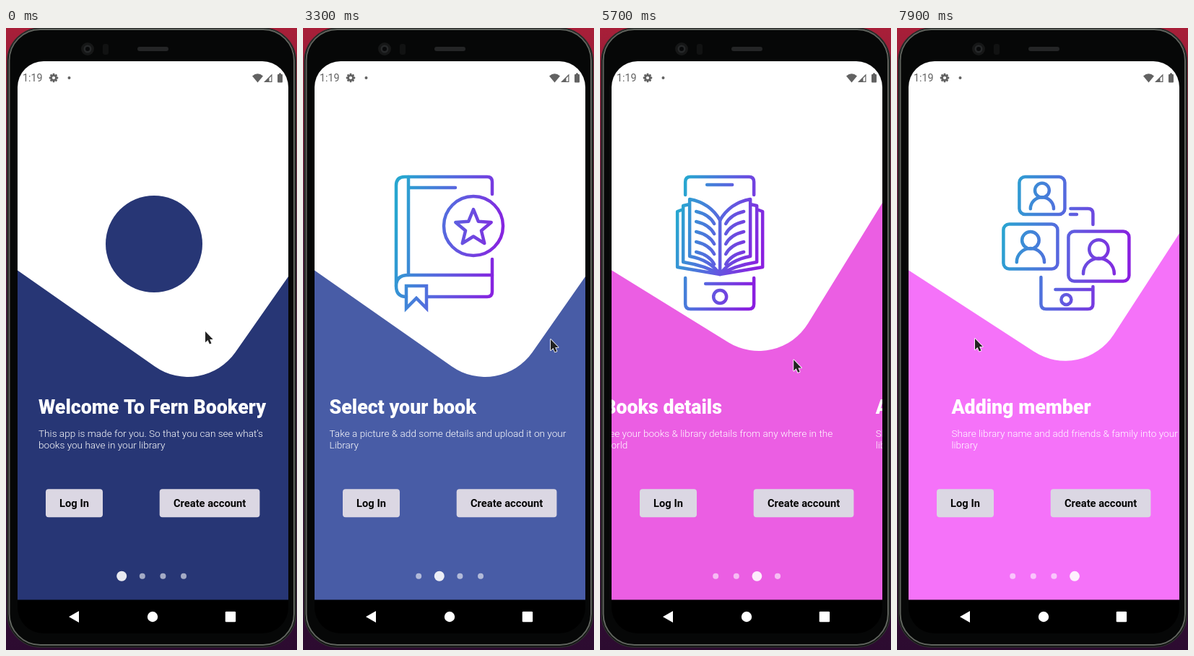
An HTML page with a canvas that plays this animation: 403 px wide and 861 px high, repeating every 8 s.

```html
<!DOCTYPE html>
<html lang="en">
<head>
<meta charset="utf-8">
<title>Onboarding</title>
<style>
html, body { margin: 0; width: 100%; height: 100%; overflow: hidden; background: #1c0a1e; }
canvas { display: block; width: 403px; height: 861px; }
</style>
</head>
<body>
<canvas id="stage"></canvas>
<script>
const W = 403, H = 861, LOOP = 8000, STEP = 100, PAGE = 375, LAG = 80;
const FONT = 'Roboto, "Open Sans", sans-serif';
const canvas = document.getElementById('stage');
const ctx = canvas.getContext('2d');
const dpr = window.devicePixelRatio || 1;
canvas.width = Math.round(W * dpr);
canvas.height = Math.round(H * dpr);

// Each swipe turns one page forward (1) or back (-1)
const swipes = [
  { start: 1850, span: 700, dir: 1 },
  { start: 3550, span: 700, dir: 1 },
  { start: 5503, span: 800, dir: 1 },
  { start: 7720, span: 800, dir: -1 }
];

// Pointer stops: [ms, x, y], with eased moves between
const stops = [
  [500, 276, 420], [700, 298, 427], [1800, 298, 427], [2300, 85, 392], [2700, 329, 424],
  [3300, 343, 431], [4100, 24, 375], [4300, 13, 377], [4700, 270, 444], [5500, 317, 464],
  [6200, -20, 432], [6300, -20, 432], [6700, 220, 456], [7400, 117, 442], [7700, 76, 432], [7900, 108, 430]
];

const colors = [[39, 54, 117], [72, 92, 166], [235, 93, 226], [245, 114, 250]];

const pages = [
  { x: 45, title: 'Welcome To Fern Bookery', icon: emblem,
    lines: ['This app is made for you. So that you can see what\u2019s', 'books you have in your library'] },
  { x: 36.5, title: 'Select your book', icon: bookIcon,
    lines: ['Take a picture & add some details and upload it on your', 'Library'] },
  { x: 43, title: 'Books details', icon: readerIcon,
    lines: ['See your books & library details from any where in the', 'world'] },
  { x: 44.5, title: 'Adding member', icon: memberIcon,
    lines: ['Share library name and add friends & family into your', 'library'] }
];

const clamp = u => Math.min(1, Math.max(0, u));
const mix = (a, b, f) => a + (b - a) * f;

function smooth(u) {
  u = clamp(u);
  return u * u * u * (u * (u * 6 - 15) + 10);
}

// Finger drag that runs on into a settling page
function drag(u) {
  u = clamp(u);
  const a = u ** 1.92, b = (1 - u) ** 1.78;
  return a / (a + b);
}

const progress = (s, t) => (t - s.start) / s.span;
const pagePos = t => swipes.reduce((p, s) => p + s.dir * drag(progress(s, t)), 0);

// Degrees the white card is turned from rest: out and back once per swipe
const cardTurn = t => swipes.reduce((d, s) => d + 35 * (1 - smooth(Math.abs(progress(s, t) - .625) * 2)), 0);

function pointerAt(t) {
  const i = stops.findIndex(s => s[0] >= t);
  if (i < 1) return stops[0];
  const a = stops[i - 1], b = stops[i];
  const f = smooth((t - a[0]) / (b[0] - a[0]));
  return a.map((v, n) => mix(v, b[n], f));
}

function mixColor(p) {
  const i = Math.min(2, Math.floor(p));
  return 'rgb(' + colors[i].map((c, n) => Math.round(mix(c, colors[i + 1][n], p - i))) + ')';
}

function box(x, y, w, h, r, fill) {
  ctx.beginPath();
  ctx.roundRect(x, y, w, h, r);
  if (fill) { ctx.fillStyle = fill; ctx.fill(); }
}

function edge(width, color) {
  ctx.lineWidth = width;
  ctx.strokeStyle = color;
  ctx.stroke();
}

function disc(x, y, r, fill) {
  ctx.beginPath();
  ctx.arc(x, y, r, 0, Math.PI * 2);
  ctx.fillStyle = fill;
  ctx.fill();
}

function shape(d, fill) {
  ctx.fillStyle = fill;
  ctx.fill(new Path2D(d));
}

function text(s, x, y, size, weight, fill) {
  ctx.font = `${weight} ${size}px ${FONT}`;
  ctx.fillStyle = fill;
  ctx.fillText(s, x, y);
}

const draw = d => ctx.stroke(new Path2D(d));

function ring(x, y, r) {
  ctx.beginPath();
  ctx.arc(x, y, r, 0, Math.PI * 2);
  ctx.stroke();
}

function pen(x0, x1) {
  const g = ctx.createLinearGradient(x0, 270, x1, 300);
  g.addColorStop(0, '#28a6d0');
  g.addColorStop(.5, '#5b62e0');
  g.addColorStop(1, '#8a1fe0');
  ctx.strokeStyle = g;
  ctx.lineWidth = 4.5;
  ctx.lineCap = 'round';
  ctx.lineJoin = 'round';
}

function emblem() {
  disc(205, 299, 67, '#273675');
}

function bookIcon() {
  pen(127, 279);
  draw('M262 230V213Q262 206 255 206H141Q129 206 129 218V357Q129 342 146 342H262');
  draw('M129 357Q129 372 143 372M172 372H255Q262 372 262 365V320');
  draw('M146 206V342M146 221H211');
  ring(236, 274, 41);
  ctx.beginPath();
  for (let i = 0; i < 10; i++) {
    const r = i % 2 ? 11.5 : 26, a = -Math.PI / 2 + i * Math.PI / 5;
    ctx.lineTo(236 + r * Math.cos(a), 277 + r * Math.sin(a));
  }
  ctx.closePath();
  ctx.stroke();
  ctx.lineJoin = 'miter';
  draw('M143 357H171V388L157 374L143 388Z');
}

function readerIcon() {
  pen(143, 264);
  draw('M156 231V213Q156 206 163 206H244Q251 206 251 213V231M186 217H221');
  draw('M156 346V382Q156 389 163 389H244Q251 389 251 382V346M184 354H251');
  ring(204, 372, 9);
  draw('M204 266V341');
  for (const side of [1, -1]) {
    const X = x => 204 + side * x;
    let d = `M${X(0)} 266Q${X(-14)} 242 ${X(-42)} 237V316Q${X(-14)} 321 ${X(0)} 341`;
    d += `M${X(-42)} 244L${X(-51)} 246V324Q${X(-20)} 329 ${X(0)} 341`;
    d += `M${X(-51)} 251L${X(-59)} 254V331L${X(0)} 341`;
    for (let y = 254; y < 312; y += 14) d += `M${X(-33)} ${y}Q${X(-15)} ${y + 4} ${X(-8)} ${y + 17}`;
    draw(d);
  }
}

function member(x, y, w, h) {
  const mid = x + w / 2;
  box(x, y, w, h, 8);
  ctx.stroke();
  ring(mid, y + h * .36, w * .157);
  ctx.beginPath();
  ctx.arc(mid, y + h * .85, w * .255, Math.PI, 0);
  ctx.stroke();
}

function memberIcon() {
  pen(114, 293);
  member(138.5, 206, 63, 52);
  member(116.5, 271.5, 75, 62);
  member(206.5, 281.5, 84, 69);
  draw('M209.5 250H233.5Q240.5 250 240.5 257V272M209 258H218');
  draw('M168.5 345V382Q168.5 389 175.5 389H233.5Q240.5 389 240.5 382V358M188.5 362H240.5');
  ring(203.5, 376, 7);
}

function phone() {
  const bg = ctx.createLinearGradient(0, 0, 0, H);
  ['#a81f38', '#571842', '#43123c', '#2c0b30'].forEach((c, i) => bg.addColorStop(i / 3, c));
  ctx.fillStyle = bg;
  ctx.fillRect(0, 0, W, H);
  box(2, 0, 399.5, 857, 46, '#0a0b0b');
  edge(1.5, '#2b2d2b');
  box(4.5, 2, 394.5, 852, 43, '#060707');
  edge(2, '#60645e');
  disc(113, 29, 9, '#161717');
  disc(113, 29, 5.5, '#262829');
  disc(113, 29, 3, '#08090a');
  box(134, 22, 8, 15, 3, '#111212');
  box(182, 26, 43, 6, 3, '#242526');
}

function statusBar() {
  const ink = '#626262';
  text('1:19', 23, 74.2, 14.3, 400, ink);
  for (let i = 0; i < 4; i++) {
    ctx.save();
    ctx.translate(66, 69);
    ctx.rotate(i * Math.PI / 4);
    box(-1.4, -6.2, 2.8, 12.4, .6, ink);
    ctx.restore();
  }
  disc(66, 69, 4.6, ink);
  disc(66, 69, 2.1, '#fff');
  disc(87.5, 69, 2, ink);
  shape('M341 66.5Q348.5 60 356 66.5L348.5 75.5Z', ink);
  shape('M357 75L368.5 63.5V75Z', ink);
  shape('M364.5 69.5L367.3 66.7V73.8H364.5Z', '#fff');
  box(376, 64, 7, 11.5, 1, ink);
  box(378, 62.5, 3, 2, .3, ink);
}

function card(d) {
  if (d > 30) return;
  ctx.save();
  ctx.translate(252 - 9 * d - .17 * d * d, 403 - 11.4 * d + .2 * d * d);
  ctx.rotate((35 - d) * Math.PI / 180);
  ctx.beginPath();
  ctx.moveTo(80, -1500);
  ctx.arc(0, 0, 80, 0, Math.PI / 2);
  ctx.lineTo(-1500, 80);
  ctx.lineTo(-1500, -1500);
  ctx.fillStyle = '#fff';
  ctx.fill();
  ctx.restore();
}

function pageContent(page, shift) {
  if (Math.abs(shift) >= PAGE) return;
  ctx.save();
  ctx.translate(shift, 0);
  page.icon();
  text(page.title, page.x, 533.7, 26.74, 800, '#fff');
  page.lines.forEach((s, i) => text(s, page.x, 565.7 + 16 * i, 13.6, 350, '#fff'));
  ctx.restore();
}

function button(x, w, label) {
  box(x, 638.3, w, 39, 4, '#dbd7e3');
  ctx.textAlign = 'center';
  text(label, x + w / 2, 663.4, 14.7, 700, '#050505');
  ctx.textAlign = 'left';
}

function dots(p) {
  for (let i = 0; i < 4; i++) {
    const on = clamp(1 - Math.abs(p - i));
    disc(160.2 + 28.6 * i, 758.8, 4 + 3 * on, `rgba(255,255,255,${.58 + .32 * on})`);
  }
}

function navBar() {
  ctx.fillStyle = '#000';
  ctx.fillRect(16, 791.5, PAGE, 50);
  shape('M87 815L101 807V823Z', '#fff');
  disc(203, 815, 7.2, '#fff');
  box(303.7, 807.8, 14.4, 14.4, 1.2, '#fff');
}

function pointer(t) {
  const [, x, y] = pointerAt(t);
  const arrow = new Path2D('M0 0V16.5L3.8 13L6.4 19L9.2 17.8L6.7 12H11.6Z');
  ctx.save();
  ctx.translate(x, y);
  ctx.scale(.92, .92);
  ctx.lineJoin = 'round';
  ctx.lineWidth = 1.8;
  ctx.strokeStyle = '#fff';
  ctx.stroke(arrow);
  ctx.fillStyle = '#222';
  ctx.fill(arrow);
  ctx.restore();
}

function render(t) {
  const pos = pagePos(t), late = pagePos(t - LAG);
  ctx.setTransform(dpr, 0, 0, dpr, 0, 0);
  phone();
  ctx.save();
  box(16, 46, PAGE, 792, 36);
  ctx.clip();
  ctx.fillStyle = '#fff';
  ctx.fillRect(16, 46, PAGE, 60);
  statusBar();

  ctx.save();
  ctx.beginPath();
  ctx.rect(16, 105, PAGE, 687);
  ctx.clip();
  ctx.fillStyle = mixColor(late);
  ctx.fillRect(16, 105, PAGE, 687);
  card(cardTurn(t));
  pages.forEach((page, i) => pageContent(page, (i - pos) * PAGE));
  button(55, 79, 'Log In');
  button(212.7, 138.7, 'Create account');
  dots(late);
  ctx.restore();

  navBar();
  ctx.restore();
  pointer(t);
}

const start = performance.now();
function tick(now) {
  const t = Math.max(0, now - start) % LOOP;
  render(Math.min(7900, Math.floor(t / STEP) * STEP));
  requestAnimationFrame(tick);
}
render(0);
requestAnimationFrame(tick);
</script>
</body>
</html>
```
